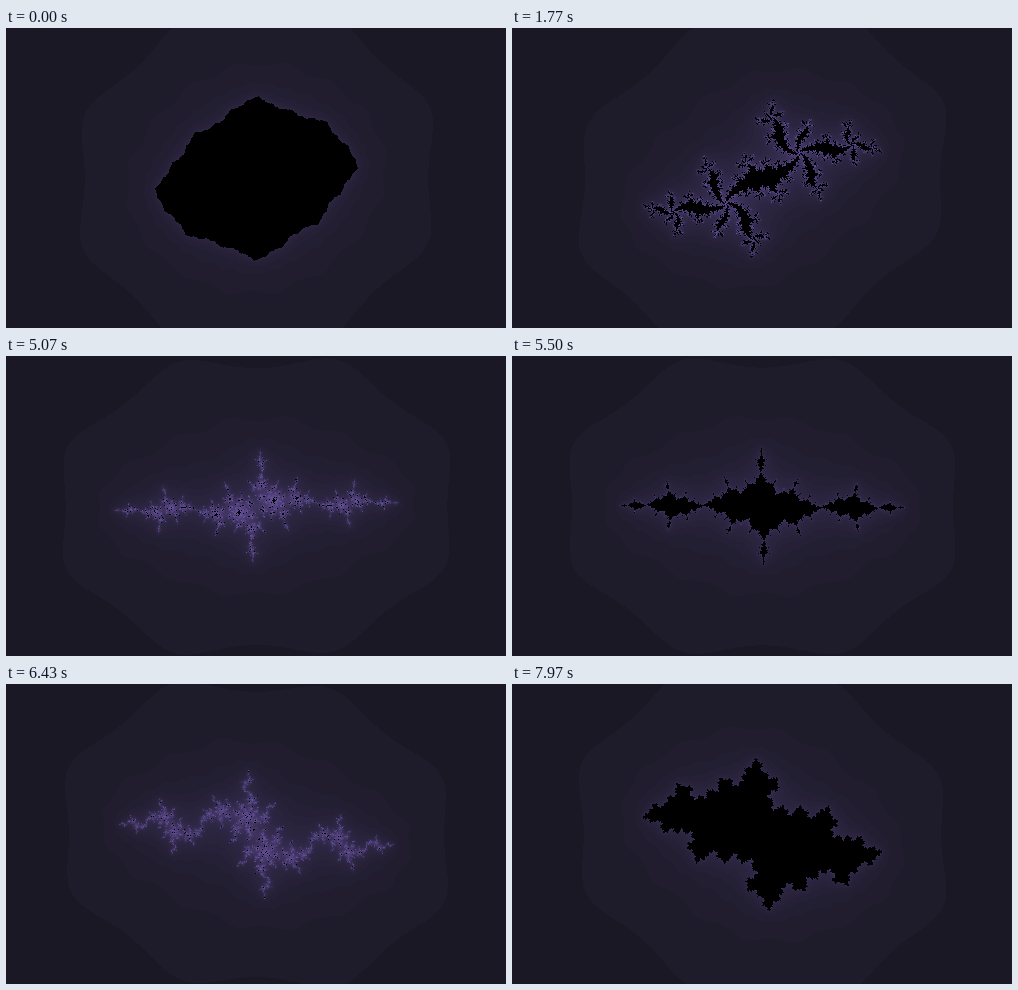
These frames come from a looping animation (500x300 px, 8000 ms). An HTML page with a canvas:

```html
<!DOCTYPE html>
<html lang="en">
<head>
<meta charset="utf-8">
<title>Julia set</title>
<style>
  html, body { margin: 0; width: 100%; height: 100%; overflow: hidden; background: #1b1926; }
  canvas { display: block; width: 500px; height: 300px; }
</style>
</head>
<body>
<canvas width="500" height="300"></canvas>
<script>
const LOOP = 8000;
const FPS = 30;
const MAX_STEPS = 100;
const PLANE_WIDTH = 6;

const canvas = document.querySelector('canvas');
const { width, height } = canvas;
const ctx = canvas.getContext('2d');
const image = ctx.createImageData(width, height);
const pixels = new Uint32Array(image.data.buffer);

const packColor = (r, g, b) => (255 << 24 | b << 16 | g << 8 | r) >>> 0;

// Slate to violet by escape time; points that never escape are black.
const palette = Array.from({ length: MAX_STEPS + 1 }, (_, n) => {
  if (n === MAX_STEPS) return packColor(0, 0, 0);
  const s = Math.sqrt(n / MAX_STEPS);
  return packColor(18 + 87 * s, 18.5 + 64 * s, 24 + 137 * s);
});

function escapeTime(a, b, ca, cb) {
  for (let n = 0; n < MAX_STEPS; n++) {
    const aa = a * a;
    const bb = b * b;
    if (aa * aa + bb * bb > 256) return n;
    b = 2 * a * b + cb;
    a = aa - bb + ca;
  }
  return MAX_STEPS;
}

// The constant travels round a circle in the complex plane.
function constantAt(seconds) {
  const degrees = 6 + 33.5 * seconds + 0.22 * seconds * seconds;
  const angle = degrees * Math.PI / 180;
  return [-0.745 + 0.5 * Math.cos(angle), 0.115 + 0.5 * Math.sin(angle)];
}

function draw(seconds) {
  const [ca, cb] = constantAt(seconds);
  const unit = PLANE_WIDTH / width;
  for (let y = 0, i = 0; y < height; y++) {
    for (let x = 0; x < width; x++, i++) {
      const n = escapeTime((x - width / 2) * unit, (y - height / 2) * unit, ca, cb);
      pixels[i] = palette[n];
    }
  }
  ctx.putImageData(image, 0, 0);
}

let shown = -1;
function tick() {
  const step = Math.floor((performance.now() % LOOP) / 1000 * FPS);
  if (step !== shown) {
    shown = step;
    draw(step / FPS);
  }
  requestAnimationFrame(tick);
}
tick();
</script>
</body>
</html>
```
